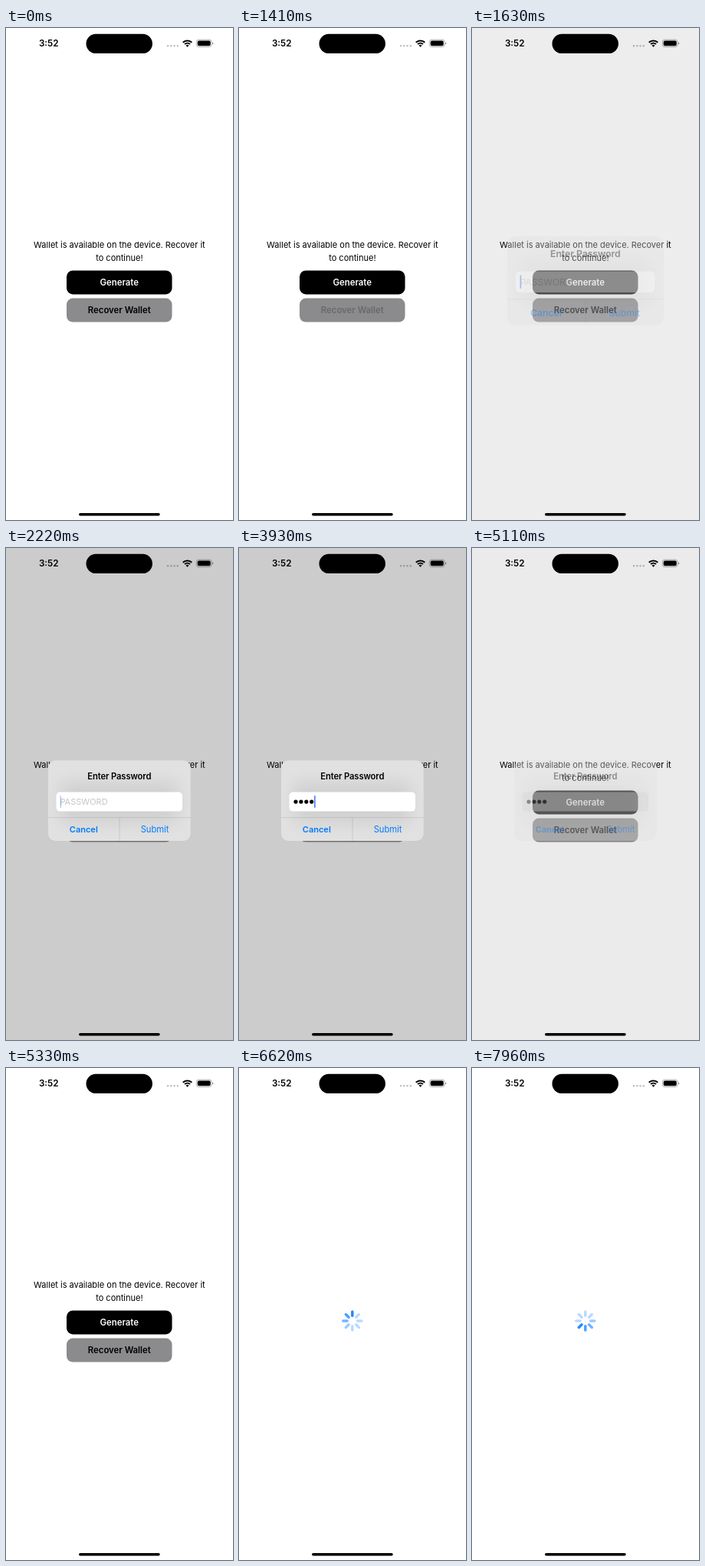
Write an HTML page that moves like this. It is 296 by 640 pixels and loops after 8000 ms.

```html
<!DOCTYPE html>
<html lang="en">
<head>
<meta charset="utf-8">
<title>Wallet recovery</title>
<style>
  html, body { margin: 0; width: 100%; height: 100%; overflow: hidden; background: #fff; }
  svg { display: block; width: 296px; height: 640px; }
  text { font: 400 11px Inter, Roboto, sans-serif; text-anchor: middle; }
  .semi { font-weight: 600; }
  .button { font-size: 11.35px; }
  .link { fill: #007aff; }
  #alert { transform-origin: 147.9px 328.5px; }
</style>
</head>
<body>
<svg viewBox="0 0 296 640">
  <defs>
    <clipPath id="panelClip"><rect x="55" y="276.3" width="185.7" height="104.7" rx="9.6"/></clipPath>
    <filter id="soft" x="-50%" y="-50%" width="200%" height="200%"><feGaussianBlur stdDeviation="11"/></filter>
  </defs>
  <rect width="296" height="640" fill="#fff"/>

  <g id="home">
    <text x="147.9" y="286">Wallet is available on the device. Recover it</text>
    <text x="147.9" y="302.6">to continue!</text>
    <rect x="79" y="315.4" width="137.5" height="31" rx="8.2"/>
    <text class="semi button" x="147.8" y="334.5" fill="#fff">Generate</text>
    <rect x="79" y="351.6" width="137.5" height="31" rx="8.2" fill="#8b8b8e"/>
    <text id="recover" class="semi button" x="147.8" y="371">Recover Wallet</text>
  </g>

  <g id="spinner" transform="translate(147.8 329)" stroke="#007aff" stroke-width="3.5" stroke-linecap="round"></g>

  <rect id="dim" width="296" height="640"/>

  <g id="alert">
    <g id="panel" clip-path="url(#panelClip)">
      <rect x="55" y="276" width="186" height="106" fill="#e1e1e1"/>
      <rect x="72" y="305" width="151" height="52" opacity=".08" filter="url(#soft)"/>
    </g>
    <g id="content">
      <text class="semi" x="147.8" y="301" style="font-size:11.2px" letter-spacing="-.1">Enter Password</text>
      <rect id="field" x="65.5" y="317.6" width="164.5" height="25" rx="5"/>
      <path id="rules" d="M55 350.6H240.7M148 350.6V381" stroke="#000" stroke-opacity=".14" stroke-width=".7"/>
      <text id="hint" x="70.4" y="334.2" fill="#c4c4c6" style="text-anchor:start">PASSWORD</text>
      <g id="dots"></g>
      <rect id="caret" y="322" width="1.5" height="16" rx=".7" fill="#3f72f5"/>
      <text class="semi link" x="101.3" y="370.3">Cancel</text>
      <text class="link" x="194.1" y="370.3" style="font-size:11.2px">Submit</text>
    </g>
  </g>

  <g id="status">
    <text class="semi" x="55.7" y="24.3" style="font-size:11.7px">3:52</text>
    <rect x="104.5" y="7.8" width="86.4" height="25.3" rx="12.6"/>
    <path d="M211 23.2h13" stroke="#000" stroke-opacity=".25" stroke-width="2.6" stroke-linecap="round" stroke-dasharray="0 4.27"/>
    <path d="M230.7 18.8A8.3 8.3 0 0 1 242.3 18.8M233 21.1A5.1 5.1 0 0 1 240 21.1" fill="none" stroke="#000" stroke-width="2"/>
    <path d="M236.5 24.8L234.5 22.8A2.8 2.8 0 0 1 238.5 22.8Z"/>
    <rect x="248.3" y="15.2" width="19.8" height="9.4" rx="3" fill="none" stroke="#000" stroke-opacity=".38" stroke-width=".8"/>
    <rect x="249.7" y="16.6" width="17" height="6.6" rx="1.9"/>
    <path d="M269 18.3Q270.3 18.8 270.3 19.9T269 21.5Z" fill-opacity=".4"/>
    <rect x="95" y="631" width="105.7" height="3.5" rx="1.75"/>
  </g>
</svg>
<script>
const LOOP = 8000;
const PRESS = 1410, OPEN = 1630, CLOSE = 4890, LOAD = 5560;
const FADE_STEP = 107, FADE_STEPS = 5;
const CARET_OFF = 2680;
const KEYS = [3480, 3680, 3680, 3930];
const CHAR_WIDTH = 6.9;

const el = Object.fromEntries([...document.querySelectorAll('[id]')].map(node => [node.id, node]));
const clamp = x => Math.min(1, Math.max(0, x));
const show = (node, on) => { node.style.display = on ? '' : 'none'; };

function add(parent, tag, attrs) {
  const node = document.createElementNS('http://www.w3.org/2000/svg', tag);
  for (const key in attrs) node.setAttribute(key, attrs[key]);
  return parent.appendChild(node);
}

const dots = KEYS.map((_, i) => add(el.dots, 'circle', { cx: 74 + CHAR_WIDTH * i, cy: 330.1, r: 2.6 }));
const ticks = Array.from({ length: 8 }, (_, i) =>
  add(el.spinner, 'path', { d: 'M0-6.7V-12', transform: `rotate(${45 * i})` }));

// Progress 0..1 in a few even jumps, the first one at the start time.
const fade = (t, start) => clamp((Math.floor((t - start) / FADE_STEP) + 1) / FADE_STEPS);

function renderAlert(t) {
  const entered = 1 - (1 - fade(t, OPEN)) ** 2;
  const alpha = entered * (1 - fade(t, CLOSE));
  const leaving = t >= CLOSE;
  show(el.alert, alpha > 0);
  el.dim.style.opacity = .2 * alpha;
  el.panel.style.opacity = el.content.style.opacity = alpha;
  el.alert.style.transform = `scale(${1.16 - .16 * entered})`;
  el.field.style.fill = leaving ? '#d6d6d6' : '#fff';
  show(el.rules, !leaving);

  const typed = KEYS.filter(time => time <= t).length;
  show(el.hint, typed === 0);
  dots.forEach((dot, i) => show(dot, i < typed));
  show(el.caret, !leaving);
  el.caret.setAttribute('x', 70.5 + CHAR_WIDTH * typed);
  el.caret.style.opacity = clamp((Math.abs(t - CARET_OFF) - 400) / 150);
}

function renderSpinner(t) {
  const head = Math.floor((t - LOAD + 560) / 100);
  ticks.forEach((tick, i) => {
    const lag = (head - i + 8) % 8;
    tick.style.opacity = Math.max(.27, .87 - .16 * lag);
  });
}

function render(t) {
  const loading = t >= LOAD;
  show(el.home, !loading);
  show(el.spinner, loading);
  el.recover.style.fill = t >= PRESS && t < OPEN ? '#69696c' : '#000';
  renderAlert(t);
  if (loading) renderSpinner(t);
}

const start = performance.now();
function frame() {
  render((performance.now() - start) % LOOP);
  requestAnimationFrame(frame);
}
frame();
</script>
</body>
</html>
```
